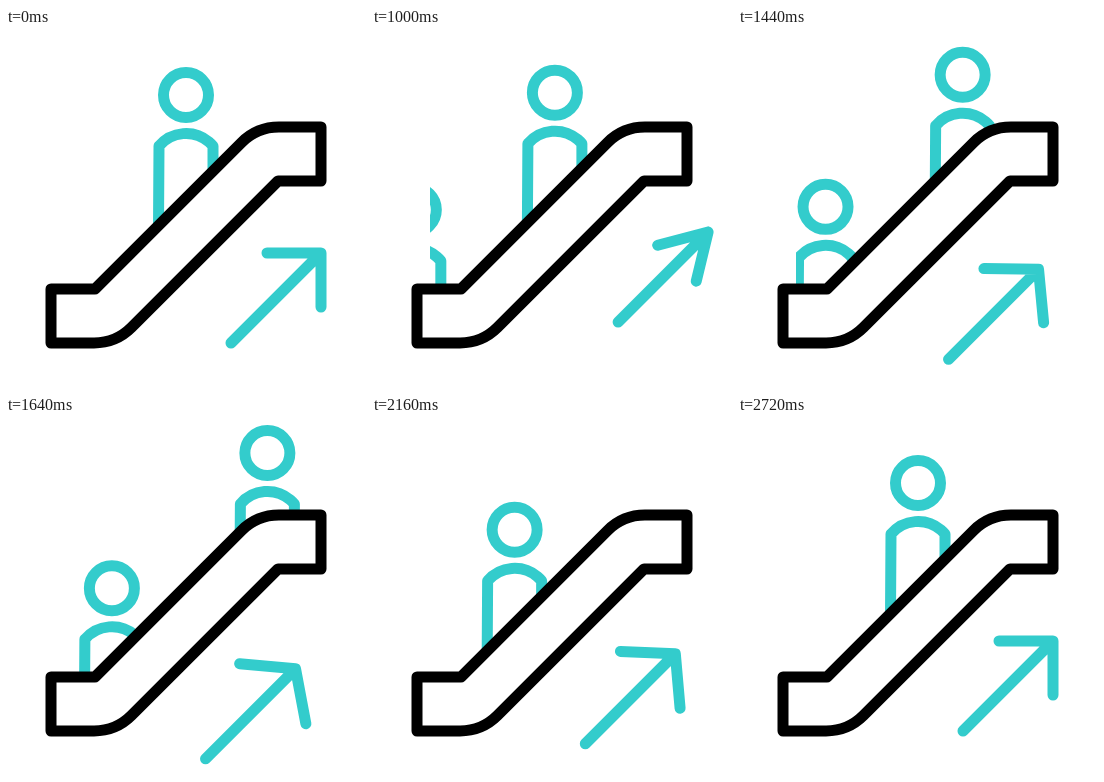
An HTML page with a canvas for the animation above (3000 ms loop, 360 by 360 pixels).

```html
<!DOCTYPE html>
<html lang="en">
<head>
<meta charset="utf-8">
<title>Escalator going up</title>
<style>
  html, body { margin: 0; width: 100%; height: 100%; overflow: hidden; background: #fff; }
  canvas { display: block; width: 360px; height: 360px; }
</style>
</head>
<body>
<canvas id="stage" width="360" height="360"></canvas>
<script>
const ctx = document.getElementById('stage').getContext('2d');
const LOOP = 3000;
const TEAL = '#33cccc';
const BLACK = '#000';

// Keys are [time, x, y].
const leavingPath = [
  [840, 180, 67], [1280, 202, 54.7], [1640, 261.2, 37], [1960, 326.3, 32], [2140, 362, 32]
];
const arrivingPath = [
  [700, 22, 182], [1280, 72.2, 180.2], [1640, 105.8, 172.3],
  [1960, 127, 138], [2400, 161, 87], [2720, 180, 67]
];

// Keys are [time, tip x, tip y, left barb x, y, right barb x, y], barbs relative to the tip.
const arrowKeys = [
  [160, 315, 225, -54, 0, 0, 54],
  [870, 339.5, 200.5, -50, 14.5, -13.5, 48.7],
  [1700, 288.8, 253.6, -56, -5.3, 10.7, 55],
  [2560, 315, 225, -54, 0, 0, 54]
];

function segmentAt(keys, t) {
  let i = 0;
  while (i < keys.length - 2 && t >= keys[i + 1][0]) i++;
  const span = keys[i + 1][0] - keys[i][0];
  const u = Math.min(1, Math.max(0, (t - keys[i][0]) / span));
  return { i, u, span };
}

function eased(keys, t, column) {
  const { i, u } = segmentAt(keys, t);
  const s = u * u * (3 - 2 * u);
  return keys[i][column] + (keys[i + 1][column] - keys[i][column]) * s;
}

function slope(keys, i, column) {
  if (i === 0 || i === keys.length - 1) return 0;
  const before = keys[i - 1], after = keys[i + 1];
  return (after[column] - before[column]) / (after[0] - before[0]);
}

// Smooth Hermite motion through all keys, at rest at both ends.
function flowing(keys, t, column) {
  const { i, u, span } = segmentAt(keys, t);
  return eased(keys, t, column)
    + span * slope(keys, i, column) * u * (1 - u) * (1 - u)
    - span * slope(keys, i + 1, column) * u * u * (1 - u);
}

function upperRail() {
  ctx.lineTo(89, 261);
  ctx.arcTo(251, 99, 315, 99, 53);
}

function drawPerson(path, t) {
  ctx.save();
  ctx.translate(flowing(path, t, 1), flowing(path, t, 2));
  ctx.beginPath();
  ctx.arc(0, 0, 22.5, 0, Math.PI * 2);
  ctx.stroke();

  const radius = 35.4;
  const half = Math.asin(27 / radius);
  ctx.beginPath();
  ctx.moveTo(-27.5, 131);
  ctx.lineTo(-27, 51);
  ctx.arc(0, 38.5 + radius, radius, -Math.PI / 2 - half, -Math.PI / 2 + half);
  ctx.lineTo(27, 131);
  ctx.stroke();
  ctx.restore();
}

function drawPeople(t) {
  ctx.save();
  ctx.beginPath();
  ctx.moveTo(58, 0);
  ctx.lineTo(58, 261);
  upperRail();
  ctx.lineTo(298, 99);
  ctx.lineTo(298, 0);
  ctx.clip();
  drawPerson(leavingPath, t);
  drawPerson(arrivingPath, t);
  ctx.restore();
}

function drawRail() {
  ctx.beginPath();
  ctx.moveTo(45, 261);
  upperRail();
  ctx.lineTo(315, 99);
  ctx.lineTo(315, 153);
  ctx.lineTo(272, 153);
  ctx.arcTo(110, 315, 45, 315, 53);
  ctx.lineTo(45, 315);
  ctx.closePath();
  ctx.stroke();
}

function drawArrow(t) {
  const [tipX, tipY, leftX, leftY, rightX, rightY] =
    [1, 2, 3, 4, 5, 6].map(column => eased(arrowKeys, t, column));
  ctx.save();
  ctx.translate(tipX, tipY);
  ctx.beginPath();
  ctx.moveTo(-90, 90);
  ctx.lineTo(0, 0);
  ctx.moveTo(leftX, leftY);
  ctx.lineTo(0, 0);
  ctx.lineTo(rightX, rightY);
  ctx.stroke();
  ctx.restore();
}

function draw(t) {
  ctx.fillStyle = '#fff';
  ctx.fillRect(0, 0, 360, 360);
  ctx.lineWidth = 11;
  ctx.lineCap = ctx.lineJoin = 'round';
  ctx.strokeStyle = TEAL;
  drawPeople(t);
  drawArrow(t);
  ctx.strokeStyle = BLACK;
  drawRail();
}

const start = performance.now();
function tick() {
  draw((performance.now() - start) % LOOP);
  requestAnimationFrame(tick);
}
tick();
</script>
</body>
</html>
```
